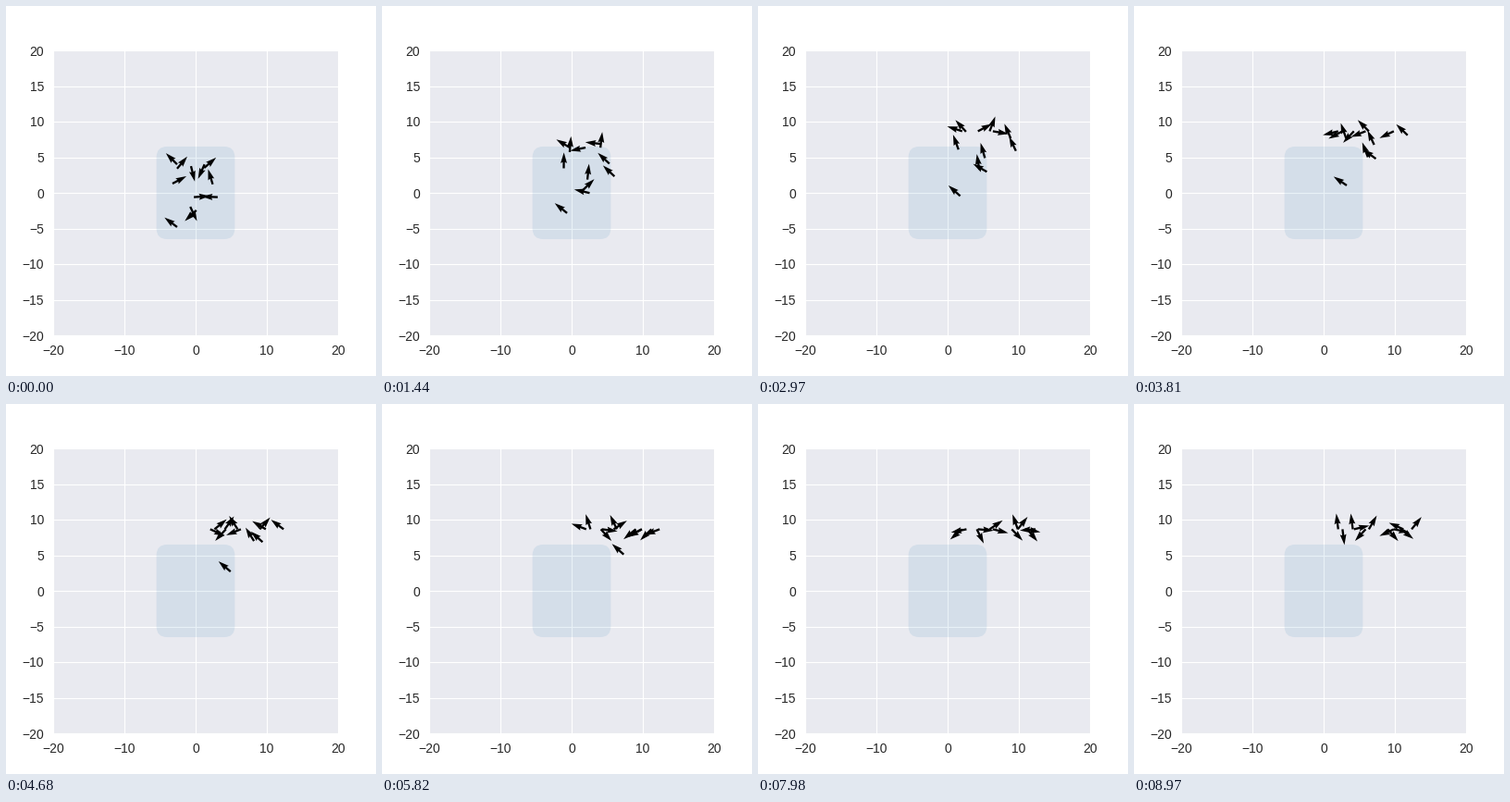
A matplotlib script for the animation above (9 s loop, 400 by 400 pixels).

```python
import numpy as np
import matplotlib.pyplot as plt
from matplotlib.animation import FuncAnimation
from matplotlib.patches import FancyBboxPatch

FRAMES, INTERVAL = 300, 30
WALL = 8.65                   # height where every agent stops
GROWTH = 0.0029               # growth of speed per frame
COMMON, TURN = 130, 0.018     # shared heading in degrees, pull towards it
CALM, WILD = 2, 28            # heading noise on the way and at the wall

# start x, start y, start heading
STARTS = np.array([
    (-2.60, 4.00, 135), (-2.60, 3.40, 50), (-3.25, 1.30, 28),
    (-0.65, 3.75, 284), (1.25, 4.00, 246), (1.20, 3.50, 41),
    (2.40, 1.20, 107), (-0.25, -0.60, 4), (3.10, -0.60, 178),
    (-0.75, -1.95, -65), (0.10, -2.45, 223), (-2.60, -4.80, 143),
])
X0, Y0, HEADING0 = STARTS.T


def positions():
    """Diagonal paths, speeding up and ending at the wall."""
    speed = 16.9 + 0.9 * X0 + 0.3 * Y0
    gap = WALL - Y0
    growth = np.expm1(GROWTH * np.arange(FRAMES))
    travel = np.minimum(np.outer(growth, speed), gap)
    return X0 + travel, Y0 + travel, travel >= gap


def headings(settled):
    """Turn to the common heading on the way, then wander at the wall."""
    rng = np.random.default_rng(4)
    path = [HEADING0]
    for still in settled[1:]:
        noise = rng.normal(size=len(X0))
        pull = TURN * (COMMON - path[-1]) + CALM * noise
        path.append(path[-1] + np.where(still, WILD * noise, pull))
    return np.radians(path)


xs, ys, settled = positions()
theta = headings(settled)
us, vs = np.cos(theta), np.sin(theta)

plt.rcParams.update({
    "font.family": "Liberation Sans", "font.size": 10,
    "axes.facecolor": "#E9EAF0", "axes.axisbelow": True,
    "grid.color": "white", "grid.linewidth": 0.8,
    "xtick.major.size": 0, "ytick.major.size": 0,
    "xtick.major.pad": 7, "ytick.major.pad": 7,
    "xtick.labelcolor": "0.15", "ytick.labelcolor": "0.15",
})

fig, ax = plt.subplots(figsize=(4, 4), dpi=100)
ax.set(xlim=(-20, 20), ylim=(-20, 20), aspect="equal",
       xticks=range(-20, 21, 10), yticks=range(-20, 21, 5))
ax.grid(True)
ax.spines[:].set_visible(False)
ax.add_patch(FancyBboxPatch((-4, -5), 8, 10, boxstyle="round,pad=1.5",
                            fc="tab:blue", ec="none", alpha=0.1))
arrows = ax.quiver(xs[0], ys[0], us[0], vs[0], color="black",
                   scale=18, width=0.0075, zorder=3)


def update(i):
    arrows.set_offsets(np.column_stack((xs[i], ys[i])))
    arrows.set_UVC(us[i], vs[i])
    return arrows,


anim = FuncAnimation(fig, update, frames=FRAMES, interval=INTERVAL,
                     repeat=True, repeat_delay=0)
plt.show()
```
